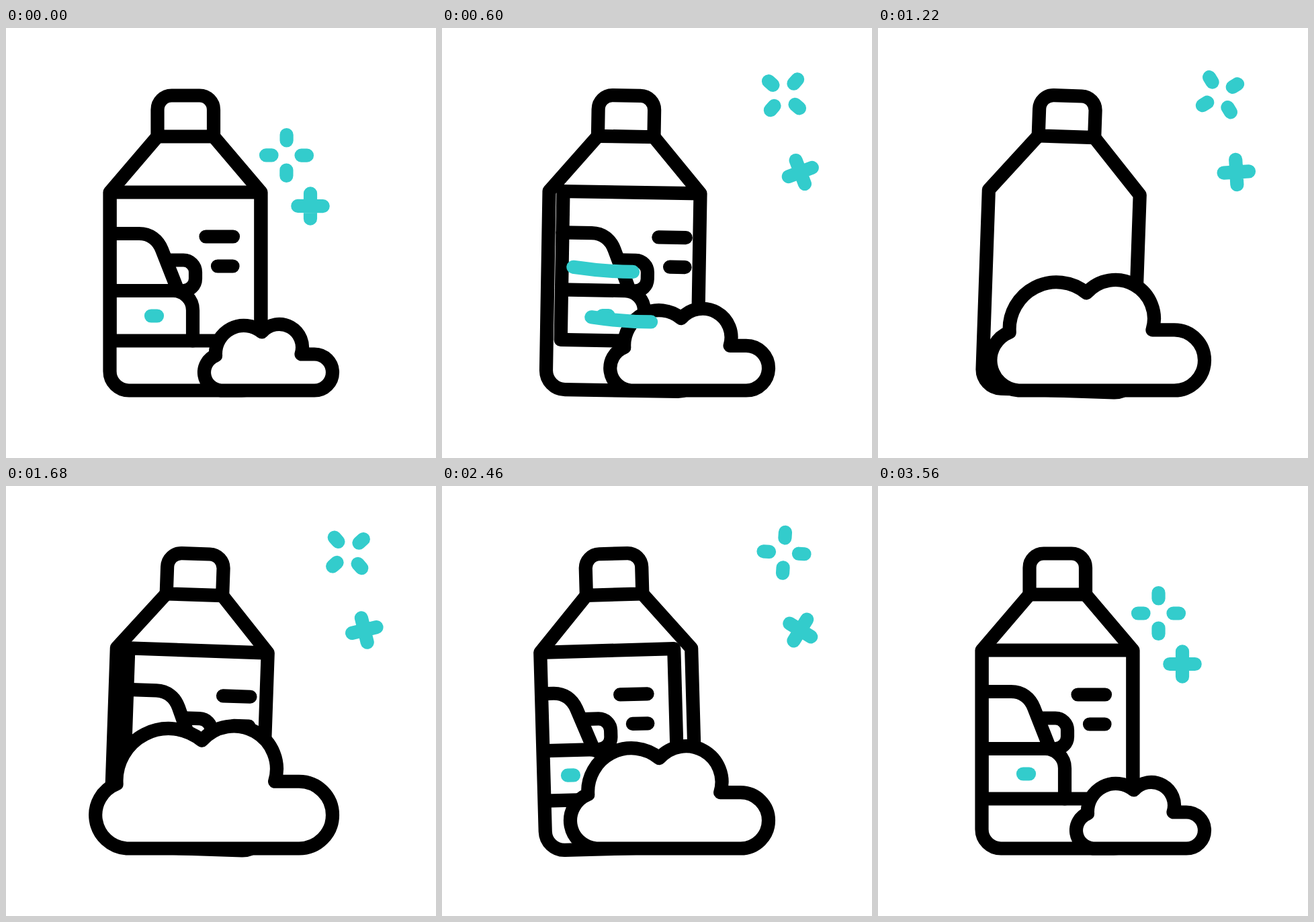
An HTML page that plays this animation: 640x640 px, repeating every 3600 ms.

```html
<!DOCTYPE html>
<html lang="en">
<head>
<meta charset="utf-8">
<title>Bottle and foam</title>
<style>
  html, body { margin: 0; width: 100%; height: 100%; overflow: hidden; background: #fff; }
  svg { display: block; width: 100vw; height: 100vh; }
  path { fill: none; stroke: #000; stroke-width: 20.2; stroke-linecap: round; stroke-linejoin: round; }
  .cyan, .cyan path { stroke: #33cccc; }
  #cloud { fill: #fff; vector-effect: non-scaling-stroke; }
</style>
</head>
<body>
<svg viewBox="0 0 640 640">
  <clipPath id="inside"><use href="#body"/></clipPath>
  <g id="bottle">
    <g clip-path="url(#inside)">
      <g id="label">
        <path d="M154.5 244.5H379.5V465.5H154.5Z"/>
        <path d="M154.5 306H198C214 306 226 315 232 330L256 391"/>
        <path d="M240 345.5H264A18 18 0 0 1 282 363.5V373A18 18 0 0 1 264 391"/>
        <path d="M154.5 391H249A29 29 0 0 1 278 420V465.5"/>
        <path d="M297.5 310.5H338M315 354.5H337.5"/>
        <path class="cyan" d="M216 428.5H225"/>
      </g>
    </g>
    <path d="M225.5 161.5V121.5A21 21 0 0 1 246.5 100.5H288A21 21 0 0 1 309 121.5V161.5Z"/>
    <path id="body" d="M225.5 161.5L154.5 244.5V511A28.5 28.5 0 0 0 183 539.5H351A28.5 28.5 0 0 0 379.5 511V244.5L309 161.5"/>
  </g>
  <path id="cloud" d="M320 539.5A27 27 0 0 1 312 487.5A42 42 0 0 1 380.7 452.5A34.5 34.5 0 0 1 439.5 485.5H459A27 27 0 0 1 459 539.5Z"/>
  <g class="cyan">
    <path id="streakA"/>
    <path id="streakB" transform="translate(27 74.5)"/>
    <path id="star" d="M0 -30.5V-22M0 22V30.5M-30.5 0H-22M22 0H30.5"/>
    <path id="cross" d="M0 -18.7V18.7M-18.7 0H18.7"/>
  </g>
</svg>
<script>
const LOOP = 3600;
const SPIN = 700; // label travel for one turn of the bottle

const el = id => document.getElementById(id);
const move = (id, value) => el(id).setAttribute('transform', value);
const ramp = (t, start, end) => Math.min(1, Math.max(0, (t - start) / (end - start)));
const ease = (t, start, end) => {
  const p = ramp(t, start, end);
  return p * p * (3 - 2 * p);
};

// The bottle leans right, swings left and settles.
const tilt = t => 2 * ease(t, 0, 1220) - 4 * ease(t, 1880, 2600) + 2 * ease(t, 2600, 3310);

// The label makes one turn, overshoots, swings back and settles.
function labelSlide(t) {
  const travel = (SPIN + 58) * ease(t, 460, 1880) - 93 * ease(t, 1880, 2600) + 35 * ease(t, 2600, 3310);
  return (travel + SPIN / 2) % SPIN - SPIN / 2;
}

const cloudSize = t => 1 + 0.85 * (ease(t, 0, 1740) - ease(t, 1740, 3520));

// Part of a shallow parabola between two x positions.
function arc(x0, x1) {
  const y = x => 363 - 0.0008 * (x - 290) ** 2;
  const mid = (x0 + x1) / 2;
  const control = 2 * y(mid) - (y(x0) + y(x1)) / 2;
  return `M${x0} ${y(x0)}Q${mid} ${control} ${x1} ${y(x1)}`;
}

function streak(t) {
  const end = start => 60 + 440 * ease(t, start, start + 320);
  const tail = end(483), head = end(439);
  return head > tail ? arc(tail, head) : '';
}

// A sparkle flies out, keeps turning there and flies home.
function sparkle(id, t, [x0, y0], [x1, y1], turnOut, turnHome) {
  const away = ease(t, 0, 480) - ease(t, 3080, 3500);
  const turn = turnOut * ramp(t, 0, 600) + 430 * ramp(t, 600, 3080) + turnHome * ramp(t, 3080, 3500);
  move(id, `translate(${x0 + (x1 - x0) * away} ${y0 + (y1 - y0) * away}) rotate(${turn})`);
}

function draw(now) {
  const t = now % LOOP;
  move('bottle', `rotate(${tilt(t)} 267 539.5)`);
  move('label', `translate(${labelSlide(t)})`);
  move('cloud', `translate(486 539.5) scale(${cloudSize(t)}) translate(-486 -539.5)`);
  for (const id of ['streakA', 'streakB']) el(id).setAttribute('d', streak(t));
  sparkle('star', t, [417.5, 189.5], [509, 99.3], 131, 69);
  sparkle('cross', t, [453, 265], [533.3, 214.5], 69, 41);
  requestAnimationFrame(draw);
}
draw(0);
</script>
</body>
</html>
```
